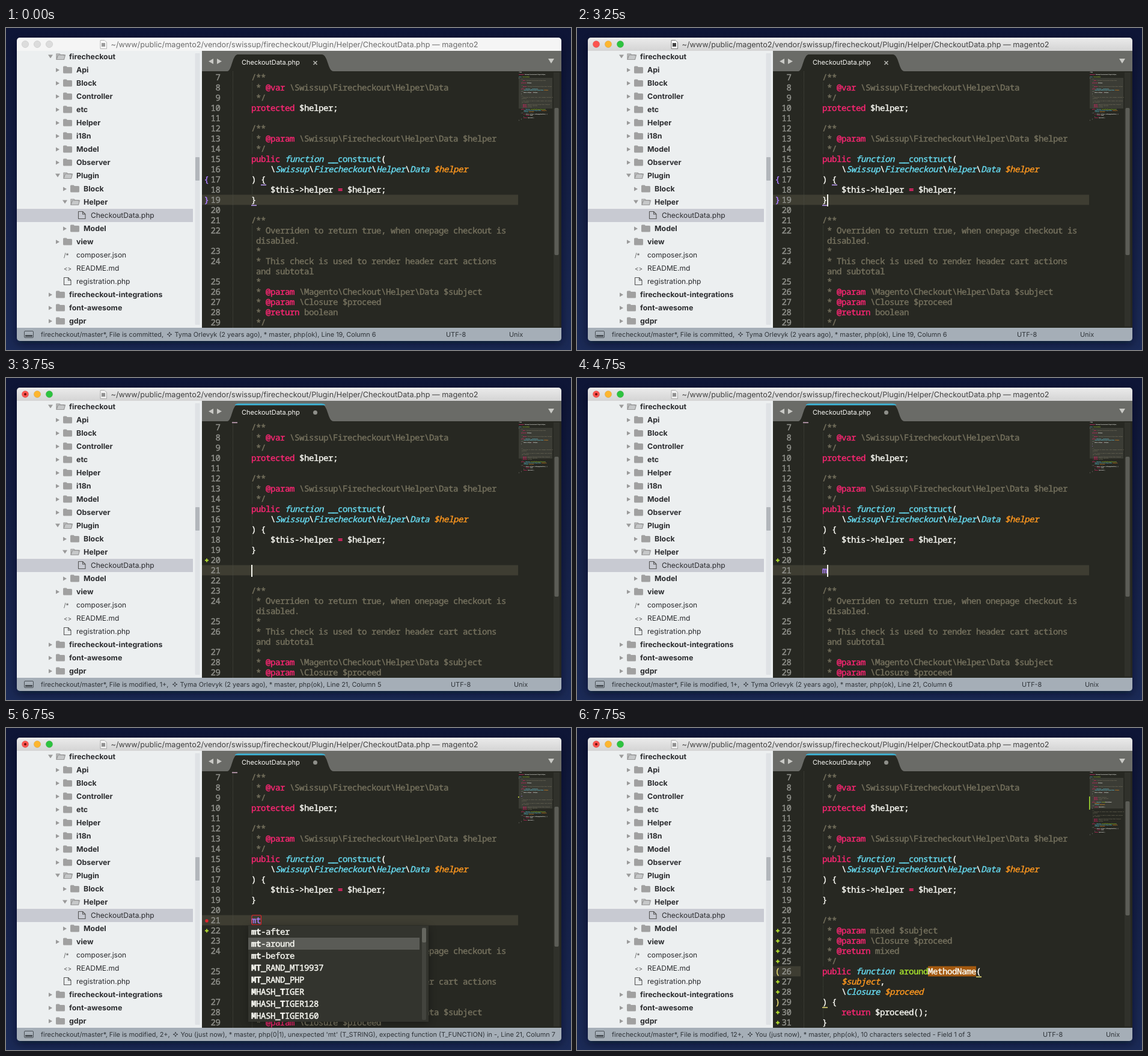
These frames come from a looping animation (940x536 px, 8000 ms). An HTML page:

```html
<!DOCTYPE html>
<html lang="en">
<head>
<meta charset="utf-8">
<title>Editor</title>
<style>
html, body { margin: 0; width: 100%; height: 100%; overflow: hidden; background: #111a3c; }
svg { display: block; width: 940px; height: 536px; }
text { font-family: Inter, "Open Sans", sans-serif; white-space: pre; text-rendering: geometricPrecision; }
.code text { font: 500 14px "Noto Sans Mono", "DejaVu Sans Mono", monospace; letter-spacing: -.4px; color: #f8f8f2; }
.code text, .code tspan { fill: currentColor; stroke: currentColor; stroke-width: .45px; }
.code .num { color: #90918b; }
.c { color: #75715e; }
.k { color: #f92672; }
.f, .t { color: #66d9ef; font-style: italic; }
.b { color: #66d9ef; }
.a { color: #fd971f; font-style: italic; }
.g { color: #a6e22e; }
.n { color: #ae81ff; }
.bold { font-weight: 700; }
</style>
</head>
<body>
<svg viewBox="0 0 940 536">
  <defs>
    <linearGradient id="desk" x2="0" y2="1"><stop stop-color="#0e1536"/><stop offset="1" stop-color="#1b2a56"/></linearGradient>
    <linearGradient id="bar" x2="0" y2="1"><stop stop-color="#ebebeb"/><stop offset="1" stop-color="#d4d4d4"/></linearGradient>
    <clipPath id="win"><rect x="18" y="16" width="906" height="505" rx="5"/></clipPath>
    <clipPath id="pane"><rect x="326" y="72" width="598" height="427"/></clipPath>
    <clipPath id="foot"><rect x="18" y="499" width="899" height="22"/></clipPath>
    <filter id="soft" x="-10%" y="-10%" width="120%" height="125%"><feGaussianBlur stdDeviation="7"/></filter>
  </defs>
  <rect width="940" height="536" fill="url(#desk)"/>
  <rect x="18" y="22" width="906" height="503" rx="6" fill="#050816" opacity=".6" filter="url(#soft)"/>
  <g clip-path="url(#win)">
    <g id="title"></g>
    <g id="side"></g>
    <rect x="326" y="38" width="598" height="34" fill="#6a6b67"/>
    <rect x="326" y="72" width="598" height="427" fill="#272822"/>
    <g id="tab"></g>
    <g id="editor" clip-path="url(#pane)"></g>
    <rect x="18" y="499" width="906" height="22" fill="#a5aeb7"/>
    <g id="status" clip-path="url(#foot)"></g>
  </g>
  <g id="over"></g>
</svg>
<script>
const LOOP = 8000, STEP = 250, CW = 8, LH = 17, X0 = 376;
const $ = id => document.getElementById(id);
const rect = (x, y, w, h, fill, more = '') => `<rect x="${x}" y="${y}" width="${w}" height="${h}" fill="${fill}" ${more}/>`;
const path = (d, fill, more = '') => `<path d="${d}" fill="${fill}" ${more}/>`;
const dot = (x, y, r, fill, more = '') => `<circle cx="${x}" cy="${y}" r="${r}" fill="${fill}" ${more}/>`;
const text = (x, y, s, more = '') => `<text x="${x}" y="${y}" ${more}>${s}</text>`;
const span = (cls, s) => `<tspan class="${cls}">${s}</tspan>`;
const rows = s => s.split('\n').slice(1, -1);

// "~" marks a soft-wrapped continuation
const intro = rows(String.raw`
&lt;?php

namespace Swissup\Firecheckout\Plugin\Helper;

class CheckoutData
{
`);
const head = rows(String.raw`
    /**
     * @var \Swissup\Firecheckout\Helper\Data
     */
    protected $helper;

    /**
     * @param \Swissup\Firecheckout\Helper\Data $helper
     */
    public function __construct(
        \Swissup\Firecheckout\Helper\Data $helper
    ) {
        $this->helper = $helper;
    }

`);
const tail = rows(String.raw`
    /**
     * Overriden to return true, when onepage checkout is
~disabled.
     *
     * This check is used to render header cart actions
~and subtotal
     *
     * @param \Magento\Checkout\Helper\Data $subject
     * @param \Closure $proceed
     * @return boolean
     */
    public function aroundCanOnepageCheckout(
        \Magento\Checkout\Helper\Data $subject,
        \Closure $proceed
    ) {
        if ($this->helper->isOnepageEnabled()) {
            return true;
        }
        return $proceed();
    }
}
`);
const snippet = rows(String.raw`
    /**
     * @param mixed $subject
     * @param \Closure $proceed
     * @return mixed
     */
    public function aroundMethodName(
        $subject,
        \Closure $proceed
    ) {
        return $proceed();
    }

`);
const hints = ['mt-after', 'mt-around', 'mt-before', 'MT_RAND_MT19937', 'MT_RAND_PHP',
  'MHASH_TIGER', 'MHASH_TIGER128', 'MHASH_TIGER160'];

const KIND = { public: 'k', protected: 'k', return: 'k', namespace: 'k', if: 'k', '=': 'k',
  function: 'f', class: 'f', __construct: 'b', around: 'g', aroundCanOnepageCheckout: 'g',
  CheckoutData: 'g', m: 'n', mt: 'n' };

function paint(s) {
  if (/^(\/\*|\*|~)/.test(s))
    return span('c', s.replace('~', '').replace(/@\w+/, w => span('k', w)));
  const arg = /^(\\|\$\w+,?$)/.test(s);
  return s.replace(/around(?=Method)|\$\w+|\w+|=/g, w => {
    const cls = arg ? (w[0] === '$' ? 'a' : 't') : KIND[w];
    return cls ? span(cls, w) : w;
  });
}
const indent = s => s[0] === '~' ? 5 : s.search(/\S|$/);
const codeLine = (s, x, y) => s.trim() ? text(x + indent(s) * CW, y, paint(s.trim())) : '';
const rowTop = r => 73.5 + LH * r;

function titleBar(t) {
  const active = t >= 1000, dirty = t >= 3500;
  const lights = active ? ['#fc544f', '#fdb62f', '#2dc33f'] : Array(3).fill('#dcdcdc');
  const ink = active ? '#404040' : '#6c6c6c';
  return rect(18, 16, 906, 22, active ? 'url(#bar)' : '#f5f5f5') +
    lights.map((c, i) => dot(32 + 20 * i, 27, 5.7, c, 'stroke="#000" stroke-opacity=".13" stroke-width=".7"')).join('') +
    (dirty ? dot(32, 27, 2, '#6d0b0a') : '') +
    `<g opacity="${active && !dirty ? 1 : .5}">` +
    path('M157 20.5h7l3.5 3.5v10.500h-10.500z', '#fff', 'stroke="#777"') + rect(159, 25, 6, 6, '#444') + '</g>' +
    text(174.5, 32, '~/www/public/magento2/vendor/swissup/firecheckout/Plugin/Helper/CheckoutData.php — magento2',
      `font-size="12.7" fill="${ink}"`);
}

// depth, kind (o open, d closed, f file, or glyph), label
const tree = [[0, 'o', 'firecheckout'], [1, 'd', 'Api'], [1, 'd', 'Block'], [1, 'd', 'Controller'], [1, 'd', 'etc'],
  [1, 'd', 'Helper'], [1, 'd', 'i18n'], [1, 'd', 'Model'], [1, 'd', 'Observer'], [1, 'o', 'Plugin'], [2, 'd', 'Block'],
  [2, 'o', 'Helper'], [3, 'f', 'CheckoutData.php'], [2, 'd', 'Model'], [1, 'd', 'view'], [1, '/*', 'composer.json'],
  [1, '&lt;&gt;', 'README.md'], [1, 'f', 'registration.php'], [0, 'd', 'firecheckout-integrations'],
  [0, 'd', 'font-awesome'], [0, 'd', 'gdpr']];

function treeRow([depth, kind, label], i) {
  const x = 12 * depth, y = 47.5 + 22 * i, dir = kind === 'd' || kind === 'o';
  let icon;
  if (kind === 'd')
    icon = path(`M${x + 71} ${y - 3}l6 3.500l-6 3.500z`, '#9a9a9a') +
      path(`M${x + 83} ${y - 4.500}q0-1.500 1.500-1.500h4l1.500 1.500h6.500q1.500 0 1.500 1.500v7.500q0 1.500-1.500 1.500h-12q-1.500 0-1.500-1.500z`, '#a0a0a0');
  else if (kind === 'o')
    icon = path(`M${x + 70} ${y - 3}h8l-4 6z`, '#9a9a9a') +
      path(`M${x + 84} ${y + 5}v-9.500h5l1.500 1.500h6v2M${x + 84} ${y + 5}l2.500-7.500h12l-2 7.500z`, '#c6c8c9', 'stroke="#979797" stroke-width="1.2"');
  else if (kind === 'f')
    icon = path(`M${x + 84.5} ${y - 6}h7l4.500 4.500v7.500h-11.500zM${x + 91.5} ${y - 6}v4.500h4.500`, 'none', 'stroke="#555" stroke-width="1.1" stroke-linejoin="round"');
  else
    icon = text(x + 84, y + 4, kind, 'font-size="10" fill="#555"');
  return icon + text(x + 105, y + 4.5, label, dir ? 'font-size="12.4" font-weight="700" fill="#2c2d30"' : 'font-size="12" fill="#2a2b2e"');
}
$('side').innerHTML = rect(18, 38, 308, 461, '#eceff0') + rect(18, 301, 293, 22, '#c8cad2') +
  rect(314.5, 42, 8, 452, '#dfe2e5', 'rx="1"') + rect(315, 215, 7, 39, '#b2b6bb', 'rx="1"') + tree.map(treeRow).join('');

function tab(dirty) {
  const ink = '#c9c9c5';
  return path('M368 72C376 72 376 44 386 44H525C536 44 535 72 545 72z', '#272822') +
    (dirty ? path('M381 45q2-2 5-2h139q4 0 6 2z', '#3db6da', 'stroke="#3db6da" stroke-width=".8"') : '') +
    path('M345 51v9l-8-4.500zM351 51v9l8-4.500zM902 51h10l-5 8z', ink) +
    text(392, 61, 'CheckoutData.php', 'font-size="11" fill="#f8f8f4"') +
    (dirty ? dot(514.5, 57.5, 3.5, '#8e8f89') : path('M511.500 55l6 6m0-6l-6 6', 'none', 'stroke="#b4b5af" stroke-width="1.6"'));
}

function caretAlpha(t) {
  if (t < 1000 || t >= 7250) return 0;
  if (t === 1000 || (t >= 3500 && t <= 3750) || (t >= 4750 && t <= 5500)) return 1;
  return { 250: 1, 500: .6 }[t % 1000] || 0;
}

function docAt(t) {
  if (t < 3500) return { add: [], row: 12, col: 5 };
  if (t < 3750) return { add: [''], row: 13, col: 4 };
  if (t < 4750) return { add: ['', ''], row: 14, col: 4, plus: [13] };
  if (t < 7250) {
    const word = t < 5000 ? 'm' : 'mt', bad = t >= 5250;
    return { add: ['    ' + word, ''], row: 14, col: 4 + word.length, plus: [bad ? 15 : 13], bad };
  }
  return { add: snippet, row: 19, done: true, plus: t < 7500 ? [15] : [15, 16, 17, 18, 20, 21, 23, 24, 25] };
}

function editor(t) {
  const { add, row, col, plus = [], bad, done } = docAt(t);
  const doc = [...head, ...add, ...tail], view = doc.slice(0, 25);
  const top = rowTop(row), dirty = t >= 3500;
  let out = rect(326, top, done ? 46 : 526, LH, '#3e3d32');
  out += path('M377.500 72v427', 'none', 'stroke="#4a4b42" stroke-dasharray="1 1"');
  if (done) out += rect(584, top, 80, LH, '#a4590f');

  out += '<g class="code">';
  let n = 6;
  view.forEach((s, r) => {
    const y = 87 + LH * r;
    if (indent(s) > 4) out += path(`M409.500 ${rowTop(r)}v17`, 'none', 'stroke="#43443b" stroke-dasharray="1 1"');
    if (s[0] !== '~') out += text(356.4, y, ++n, 'class="num" text-anchor="end"');
    out += codeLine(s, X0, y);
  });
  const mark = (r, ch, color) => text(329.5, 87 + LH * r, ch, `style="color:${color}"`);
  const under = (c, r, color) => rect(X0 + c * CW, rowTop(r) + 17, 9, 1.6, color);
  if (!dirty) out += mark(10, '{', '#ae81ff') + mark(12, '}', '#ae81ff') + under(6, 10, '#b99af0') + under(4, 12, '#b99af0');
  else if (done) out += mark(19, '(', '#e6db74') + mark(22, ')', '#e6db74') + under(36, 19, '#e6db74') + under(4, 22, '#e6db74');
  else out += under(0, -1, '#c9a5bd');
  out += '</g>';

  plus.forEach(r => out += path(`M331 ${rowTop(r) + 9}h6m-3-3v6`, 'none', 'stroke="#b3dc2e" stroke-width="1.8"'));
  if (bad) out += dot(334, 321, 2.7, '#e3242b') + rect(409, 311.5, 15.5, 16, 'none', 'rx="2" stroke="#e3242b" stroke-width="1.1"');
  const alpha = caretAlpha(t);
  if (alpha) out += rect(X0 + col * CW, top - .5, 2, 20, '#f8f8f0', `opacity="${alpha}"`);

  // minimap: the same lines at 1 x 2 pixels per character
  out += rect(853, 83, 56, 51, '#3b3c35') + '<g class="code" transform="translate(853 72) scale(.125 .11765)">' +
    [...intro, ...doc].map((s, r) => codeLine(s, 0, 14 + LH * r)).join('') + '</g>';
  if (done) out += rect(852, 114, 1.5, 22, '#a6e22e');
  else if (bad) out += rect(852, 114, 1.5, 2, '#c6d23a');

  const [y, h] = done ? [122, 190] : dirty ? [131, 233] : [133, 245];
  return out + rect(911, 74, 10, 423, '#30312b') + rect(912.5, y, 7, h, '#5c5d57', 'rx="2"') +
    (t >= 5000 && !done ? popup(t >= 6500 ? 1 : 0) : '');
}

function popup(sel) {
  return rect(404, 332, 299, 159, '#000', 'opacity=".35" filter="url(#soft)"') +
    rect(403, 329, 300, 160, '#33342e') + rect(403, 329 + 20 * sel, 285, 20, '#5a5b56') +
    rect(692, 332, 7, 154, '#43443e', 'rx="2"') + rect(692, 333, 7, 24, '#65665f', 'rx="2"') +
    '<g class="code">' + hints.map((s, i) =>
      text(408, 343.5 + 20 * i, s.replace(/^mt|^MT|^M|T(?=IGER)/g, w => span('bold', w)))).join('') + '</g>';
}

function statusAt(t) {
  const who = 'Tyma Orlevyk (2 years ago), * master, php(ok), ';
  if (t < 3500) return ['committed', 272, who + 'Line 19, Column 6', 732];
  if (t < 3750) return ['committed', 272, who + 'Line 20, Column 5', 732];
  if (t < 4750) return ['modified, 1+', 281, who + 'Line 21, Column 5', 740];
  if (t < 5250) return ['modified, 1+', 281, who + `Line 21, Column ${t < 5000 ? 6 : 7}`, 740];
  const you = 'You (just now), * master, ';
  if (t < 7250) return ['modified, 2+', 282, you +
    "php(0|1), unexpected 'mt' (T_STRING), expecting function (T_FUNCTION) in -, Line 21, Column 7", 960];
  return [`modified, ${t < 7500 ? 2 : 12}+`, t < 7500 ? 282 : 288, you + 'php(ok), 10 characters selected - Field 1 of 3', 775];
}

function status(t) {
  const [file, star, rest, enc] = statusAt(t), font = 'font-size="10.9" fill="#2e3338"';
  return rect(30.5, 504.5, 15, 11, 'none', 'rx="1.5" stroke="#4a5056"') + rect(32, 511, 12, 3, '#4a5056') +
    text(58, 514, `firecheckout/master*, File is ${file},`, font) +
    path(`M${star} 506l1 3l3 1l-3 1l-1 3l-1-3l-3-1l3-1z`, 'none', 'stroke="#33383e" stroke-width=".8"') +
    text(star + 8.5, 514, rest, font) + text(enc, 514, 'UTF-8', font) + text(enc + 105, 514, 'Unix', font);
}

function pointer(t) {
  if (t < 250 || t >= 1500) return '';
  const k = Math.min(1, (t - 250) / 750), left = (1 - k) ** 2;
  return path('M0 0v14.500l3.400-3.200l2.300 5.300l2.600-1.100l-2.300-5.200h4.700z', '#000',
    `stroke="#fff" stroke-width="1.2" stroke-linejoin="round" transform="translate(${420.5 + 110 * left} ${288.5 + 215 * left})"`);
}

let shown = -1;
function draw(t) {
  if (t === shown) return;
  shown = t;
  $('title').innerHTML = titleBar(t);
  $('tab').innerHTML = tab(t >= 3500);
  $('editor').innerHTML = editor(t);
  $('status').innerHTML = status(t);
  $('over').innerHTML = pointer(t);
}
const start = performance.now();
function tick() {
  const t = (performance.now() - start) % LOOP;
  draw(Math.floor(t / STEP) * STEP);
  requestAnimationFrame(tick);
}
tick();
</script>
</body>
</html>
```
